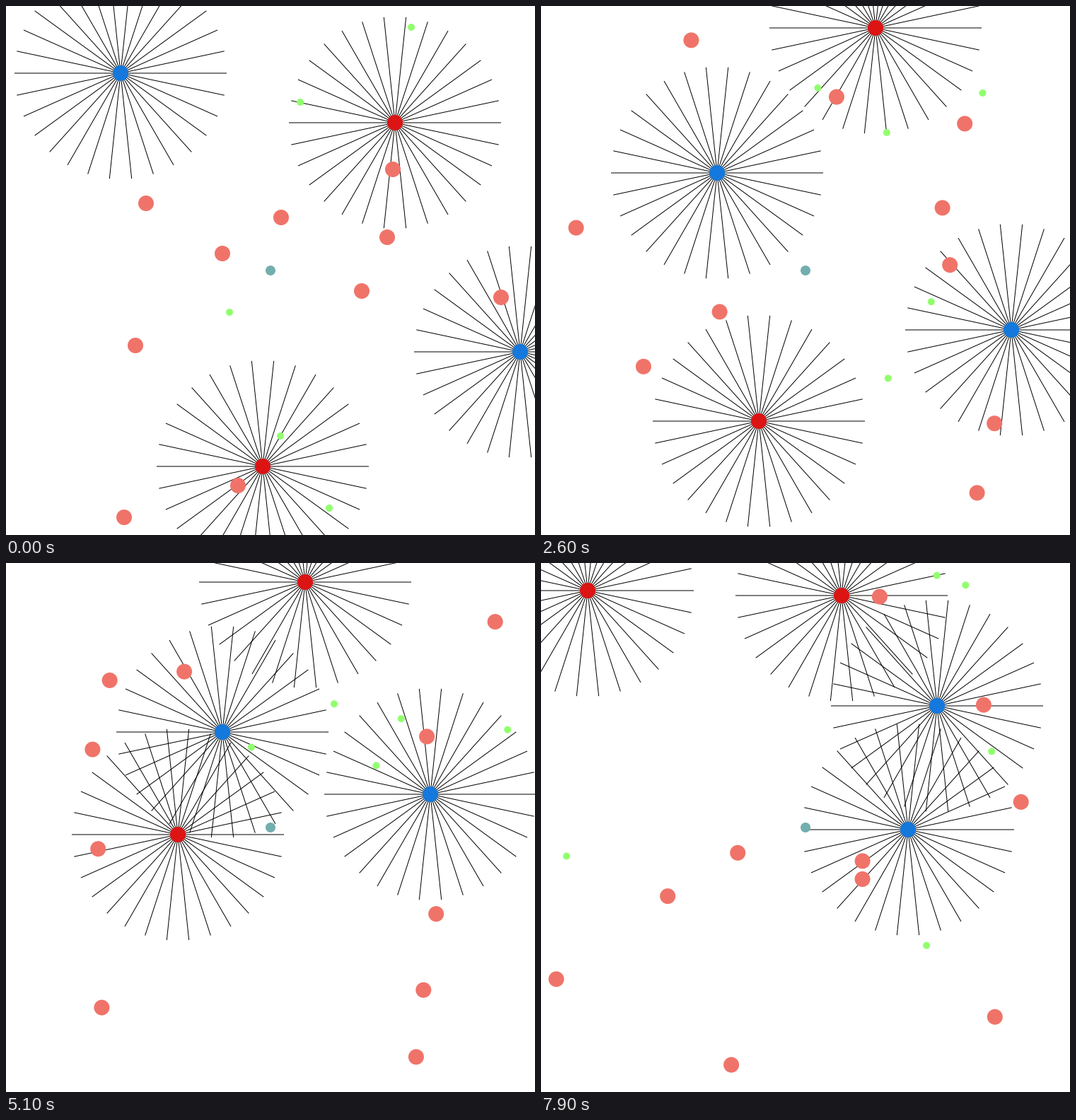
A matplotlib script for the animation above (8 s loop, 748 by 748 pixels).

```python
import numpy as np
import matplotlib.pyplot as plt
from matplotlib.animation import FuncAnimation
from matplotlib.collections import LineCollection
from matplotlib.patches import Circle

SIZE, FRAMES, STEP = 748, 80, 100
REACH, RAYS = 150, 30
RED, BLUE = "#dc1414", "#1478dc"
SALMON, GREEN, TEAL = "#f07369", "#91ff6e", "#73aeae"
ROCK, ROCK_R = np.array([374, 374]), 7

# Launch of each drifting dot: x, y, vx, vy in pixels per step.
POISON = [
    (183, 480, -8.1, -6.4), (503, 403, 3.7, -9.1), (539, 327, 1.1, -1.6),
    (700, 412, -10.85, -10.9), (547, 231, 1.2, 5.2), (328, 678, 11.1, 0.4),
    (306, 350, -3.6, -11.6), (389, 299, 9.7, 11.2), (198, 279, 2.1, 5.9),
    (167, 723, -11.15, -8.2), (640, 394, 13.8, 0.2), (468, 468, -11.4, 7.4),
]
FOOD = [
    (573, 30, 11.1, -5.5), (457, 710, 1.3, 9.6), (388, 608, 6.3, -7.3),
    (416, 136, 2.8, 1.65), (316, 433, 2.9, -12.2),
]
# Eaten dots are replaced by a fresh one: time, old, new.
SWAPS = [(34, 9, 10), (37, 8, 11)]

# Waypoints the hunters steer through at shared times.
TIMES = np.array([0, 18, 26, 42, 51, 62, 79])
HUNTERS = [
    (RED, [550, 451, 473, 451, 423, 418, 425], [165, 72, 31, 30, 27, 50, 46]),
    (RED, [363, 360, 308, 304, 243, 126, 66],
     [651, 629, 587, 435, 384, 256, 39]),
    (BLUE, [727, 669, 665, 614, 600, 473, 519],
     [489, 452, 458, 359, 327, 237, 377]),
    (BLUE, [162, 282, 249, 226, 306, 386, 560],
     [95, 198, 236, 238, 239, 238, 202]),
]


def steer(p):
    """Smooth track through the waypoints, one value per step."""
    p = np.array(p, float)
    m = np.gradient(p, TIMES)
    n = np.arange(FRAMES)
    i = np.clip(np.searchsorted(TIMES, n, side="right") - 1, 0, len(p) - 2)
    h = TIMES[i + 1] - TIMES[i]
    u = (n - TIMES[i]) / h
    return ((1 + 2 * u) * (1 - u) ** 2 * p[i] + u * (1 - u) ** 2 * h * m[i]
            + u * u * (3 - 2 * u) * p[i + 1] + u * u * (u - 1) * h * m[i + 1])


def drift(launches, r):
    """Straight flight, mirrored by the walls, thrown back by the rock."""
    state = np.array(launches, float)
    pos, vel = state[:, :2], state[:, 2:]
    track = [pos]
    for _ in range(FRAMES - 1):
        pos = pos + vel
        inside = np.clip(pos, r, SIZE - r)
        vel = np.where(pos == inside, vel, -vel)
        pos = 2 * inside - pos
        hit = np.hypot(*(pos - ROCK).T) < r + ROCK_R
        vel[hit] *= -1
        track.append(pos)
    return np.array(track)


fig = plt.figure(figsize=(SIZE / 100, SIZE / 100), dpi=100, facecolor="white")
ax = fig.add_axes([0, 0, 1, 1])
ax.set(xlim=(0, SIZE), ylim=(SIZE, 0))
ax.axis("off")


def dot(r, color, z, xy=(0, 0)):
    return ax.add_patch(Circle(xy, r, fc=color, lw=0, zorder=z))


angles = np.arange(RAYS) * 2 * np.pi / RAYS
tips = REACH * np.column_stack([np.cos(angles), np.sin(angles)])
spokes = np.stack([np.zeros_like(tips), tips], axis=1)

hunters = []
for z, (color, xs, ys) in enumerate(HUNTERS):
    rays = LineCollection(spokes, colors="black", linewidths=0.72,
                          zorder=2 * z + 1, snap=False)
    ax.add_collection(rays, autolim=False)
    track = np.column_stack([steer(xs), steer(ys)])
    hunters.append((rays, dot(11, color, 2 * z + 2), track))

dot(ROCK_R, TEAL, 20, ROCK)
swarms = []
for launches, r, color, z in ((FOOD, 5, GREEN, 21), (POISON, 11, SALMON, 22)):
    dots = [dot(r, color, z) for _ in launches]
    swarms.append((dots, drift(launches, r)))
poison = swarms[1][0]


def draw(n):
    for rays, body, track in hunters:
        rays.set_segments(spokes + track[n])
        body.center = track[n]
    for dots, track in swarms:
        for body, xy in zip(dots, track[n]):
            body.center = xy
    for t, old, new in SWAPS:
        poison[old].set_visible(n < t)
        poison[new].set_visible(n >= t)
    return []


anim = FuncAnimation(fig, draw, frames=FRAMES, interval=STEP,
                     init_func=lambda: draw(0), repeat=True, repeat_delay=0)
plt.show()
```
